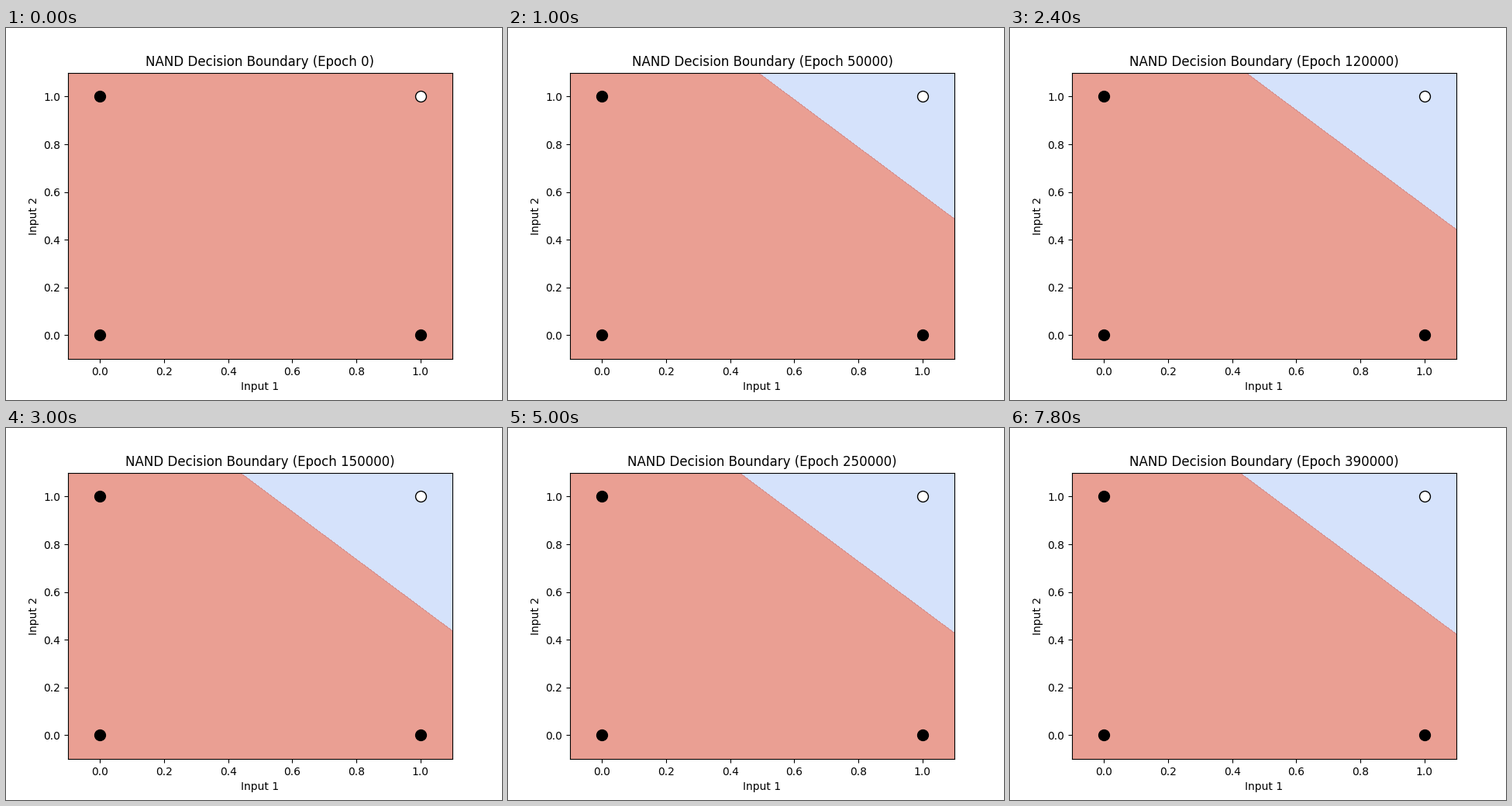
A matplotlib script that plays this animation: 640 by 480 pixels, repeating every 8000 ms.

```python
import numpy as np
import matplotlib.pyplot as plt
from matplotlib.animation import FuncAnimation

FRAMES = 40
EPOCHS_PER_FRAME = 10000
RATE = 0.001
CHUNK = 100  # epochs merged into one gradient step

inputs = np.array([[0, 0], [0, 1], [1, 0], [1, 1]], float)
targets = np.array([1, 1, 1, 0], float)
samples = np.column_stack([inputs, np.ones(4)])


def sigmoid(z):
    return 1 / (1 + np.exp(-z))


def train():
    """Weights of a single sigmoid neuron at the start of every frame."""
    weights = np.array([0, 0, 0.02])
    history = []
    for _ in range(FRAMES):
        history.append(weights.copy())
        for _ in range(EPOCHS_PER_FRAME // CHUNK):
            out = sigmoid(samples @ weights)
            delta = (targets - out) * out * (1 - out)
            weights += RATE * CHUNK * samples.T @ delta
    return history


history = train()
axis = np.linspace(-0.1, 1.1, 200)
xx, yy = np.meshgrid(axis, axis)

fig, ax = plt.subplots(figsize=(6.4, 4.8), dpi=100)


def draw(frame):
    ax.clear()
    w1, w2, bias = history[frame]
    ax.contourf(xx, yy, sigmoid(w1 * xx + w2 * yy + bias),
                levels=[-1, 0.5, 1], cmap="coolwarm", alpha=0.6)
    for (x, y), target in zip(inputs, targets):
        ax.plot(x, y, "o", markersize=10, markeredgecolor="black",
                color="black" if target else "white")
    ax.set_xlim(-0.1, 1.1)
    ax.set_ylim(-0.1, 1.1)
    ax.set_xlabel("Input 1")
    ax.set_ylabel("Input 2")
    ax.set_title(f"NAND Decision Boundary (Epoch {frame * EPOCHS_PER_FRAME})")
    return []


anim = FuncAnimation(fig, draw, frames=FRAMES, interval=200,
                     init_func=lambda: draw(0), repeat=True, repeat_delay=0)
plt.show()
```
